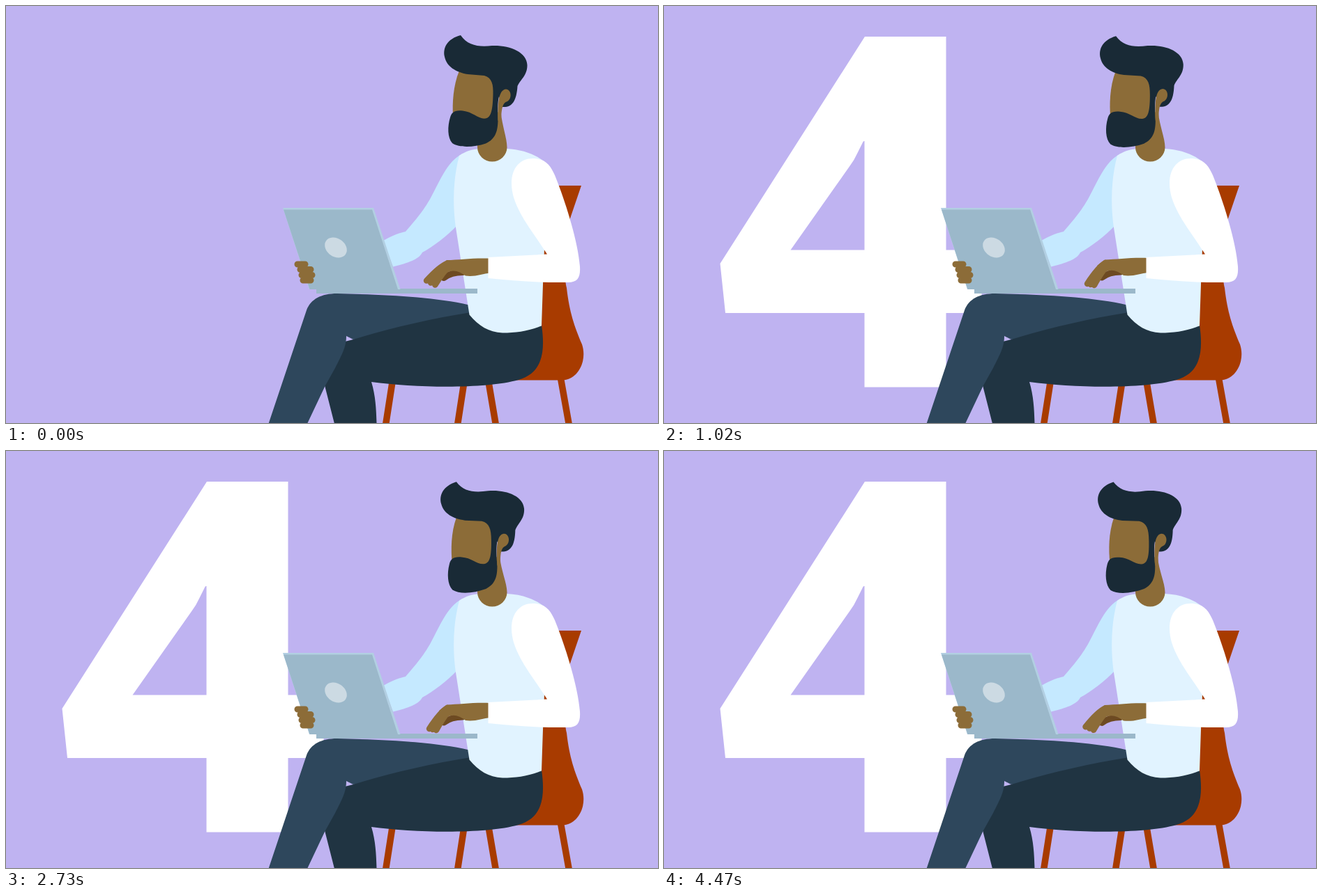
Animation, 935 px wide and 599 px high, one loop 4.5 s. Source, as an HTML page:

```html
<!DOCTYPE html>
<html lang="en">
<head>
<meta charset="utf-8">
<title>Man with laptop</title>
<style>
  html, body { margin: 0; width: 100%; height: 100%; overflow: hidden; background: #bfb3f1; }
  svg { display: block; width: 100vw; height: 100vh; }
  .skin { fill: #8c6c38; }
  .hair { fill: #192a36; }
  .chair { fill: #a83b00; }
  .line { fill: none; stroke-linecap: round; }
</style>
</head>
<body>
<svg viewBox="0 0 935 599" preserveAspectRatio="none">
  <path id="four" fill="#fff" fill-rule="evenodd" d="M288 44H404.5V350.5H455.5V441H404.5V547.5H287.5V441H88L80.5 370Z
    M181.5 350.5H287.5V194Q286 194 285.5 195L277 212Q273 221 267 229Z"/>

  <path class="line" stroke="#a83b00" stroke-width="9.5" d="M555 534L544 605M657 540L647 605M692 540L703 605M795 532L808 605"/>
  <path class="chair" d="M791 258H825L808 308C801 345 799 385 804 405C808 440 815 460 826 486C834 510 820 537 798 537.5H725L755 460V350Z"/>

  <path fill="#c5e9ff" d="M655 212C638 220 628 238 614 266C602 290 592 302 573 324C560 327 550 332 541 337L555 374.5C577 369 592 364 597 354C612 346 632 331 647 315Z"/>
  <path fill="#203442" d="M486 482L498 479L520 466L664 436L768 458C774 500 768 527 735 537C690 550 590 549 524 540C530 560 531 580 531.5 600H471L457 545Z"/>
  <path fill="#2e475c" d="M376.5 600L431 437C437 421 452 413 475 413C540 415 610 417 664 429.5V440.5C610 449 550 463 498 479L488 474C488 490 482 500 472 520L457.5 546L432 600Z"/>
  <path fill="#e1f3ff" d="M650 215C660 208 668 206 680 205H718C740 206 760 213 774 225L772 349L770 400L768 459.5C748 467 732 469.5 712 469.5C692 468 678 460 664.5 443.5L644.5 315C640 280 642 245 650 215Z"/>
  <path id="neck" class="skin"/>

  <g id="head">
    <path class="skin" d="M650 93C641 115 640 140 641 158L692 168L702 150V110L690 97Z"/>
    <path class="hair" d="M652 42C633 47 626 60 629 73C632 87 645 95 662 98L686 100C697 103 699 113 698.5 127C698 148 696 160 688 161.500C677 163 670 152 655 150.5C643 149 639 153 637 160C633 173 633 189 640 197C650 204 671 203 688 197.5C702 191 705 180 705.5 165C705 148 705 138 707 130L712 145C725 146 732 138 733.5 115C738 105 747.5 100 747.5 85C747 66 722 56 697 57C678 59 662 57 652 42Z"/>
    <path class="skin" d="M705.5 165C705 142 706 120 717 119.5C725 120 726 133 719 137C712 139 711 147 710 160Z"/>
  </g>

  <path fill="#9bb8ca" d="M445 406H676V413H445Z"/>
  <path fill="#b2cfe2" d="M397 290H527L565.5 407H435Z"/>
  <path fill="#9bb8ca" d="M398 292.5H525L562 407H435.5Z"/>
  <ellipse cx="473" cy="347" rx="17" ry="13" transform="rotate(35 473 347)" fill="#ccdae3"/>
  <path class="line" stroke="#8c6c38" stroke-width="9" d="M418 371H429M422 378.5H437M424 386.5H439M426 394H437"/>

  <g id="palm">
    <path class="line" stroke="#6d4a22" stroke-width="9" d="M628 390Q638 382 655 382"/>
    <path class="skin" d="M694 362C670 361 650 364 632 364.5L621 373L631 383C641 377 650 380 659 387C672 389 684 384 694 383Z"/>
  </g>
  <path id="fingers" class="line" stroke="#8c6c38" stroke-width="8.5"/>
  <path fill="#fff" d="M725 255C725 230 740 218 757 219C775 220 781 230 787 243C800 275 820 335 823 374C824 390 820 397 806 397C765 397.5 730 395 691.5 391V361L776 356.5L771 349C752 319 725 288 725 255Z"/>
</svg>

<script>
  const LOOP = 4500;
  const [four, neck, head, palm, fingers] =
    ['four', 'neck', 'head', 'palm', 'fingers'].map(id => document.getElementById(id));
  const lerp = (a, b, w) => a + (b - a) * w;
  const wave = s => 0.5 - 0.5 * Math.cos(Math.PI * s);

  // Key points: [ms, head tilt in degrees, finger press from 0 to 1]
  const keys = [[0, 0, 0.6], [300, -2.2, 0], [1020, -1.5, 1], [1980, -4.8, 0],
    [2730, -2.4, 1], [3750, -3.3, 0.1], [4470, -2.9, 0.75]];

  function poseAt(t) {
    const next = keys.findIndex(k => k[0] > t);
    const i = next < 0 ? keys.length - 1 : next;
    const [t0, tilt0, press0] = keys[i - 1], [t1, tilt1, press1] = keys[i];
    const s = Math.min(1, (t - t0) / (t1 - t0));
    // The fingers tap back and forth, an odd number of strokes per span.
    const strokes = 2 * Math.floor((t1 - t0) / 310) + 1;
    return {
      tilt: lerp(tilt0, tilt1, wave(s)),
      press: lerp(press0, press1, wave(strokes * s))
    };
  }

  // Fast start, long settle: cubic Bezier (.09, 1, .69, 1) over one second.
  function slideAt(t) {
    if (t >= 1000) return 0;
    let lo = 0, hi = 1;
    for (let i = 0; i < 24; i++) {
      const s = (lo + hi) / 2, r = 1 - s;
      if (3 * r * r * s * 0.09 + 3 * r * s * s * 0.69 + s ** 3 < t / 1000) lo = s; else hi = s;
    }
    return -484 * (1 - lo) ** 3;
  }

  function finger(n, press, lift) {
    const x = lerp(597 + 8 * n, 607 + 5 * n, press);
    const y = lerp(388 + 6 * n, 399 + n, press);
    const bx = 633 + n * 1.5, by = 369 + lift + n * 2;
    return `M${bx} ${by}Q${lerp(bx, x, 0.4)} ${by + 2 + (y - 385) * 0.3} ${x} ${y}`;
  }

  function draw(t) {
    four.setAttribute('transform', `translate(${slideAt(t)} 0)`);

    const { tilt, press } = poseAt(t), nod = tilt * 0.6;
    head.setAttribute('transform', `rotate(${tilt} 700 190)`);
    neck.setAttribute('d', `M${698 + nod} 150L${710 + nod} 154
      C${711 + nod} 170 718.5 190 718.5 203A21.2 20.5 0 0 1 676 203V190Z`);

    const lift = 1.5 * (1 - press);
    palm.setAttribute('transform', `translate(0 ${lift})`);
    fingers.setAttribute('d', [0, 1, 2].map(n => finger(n, press, lift)).join(''));
  }

  const start = performance.now();
  function tick(now) {
    draw(Math.max(0, now - start) % LOOP);
    requestAnimationFrame(tick);
  }
  draw(0);
  requestAnimationFrame(tick);
</script>
</body>
</html>
```
